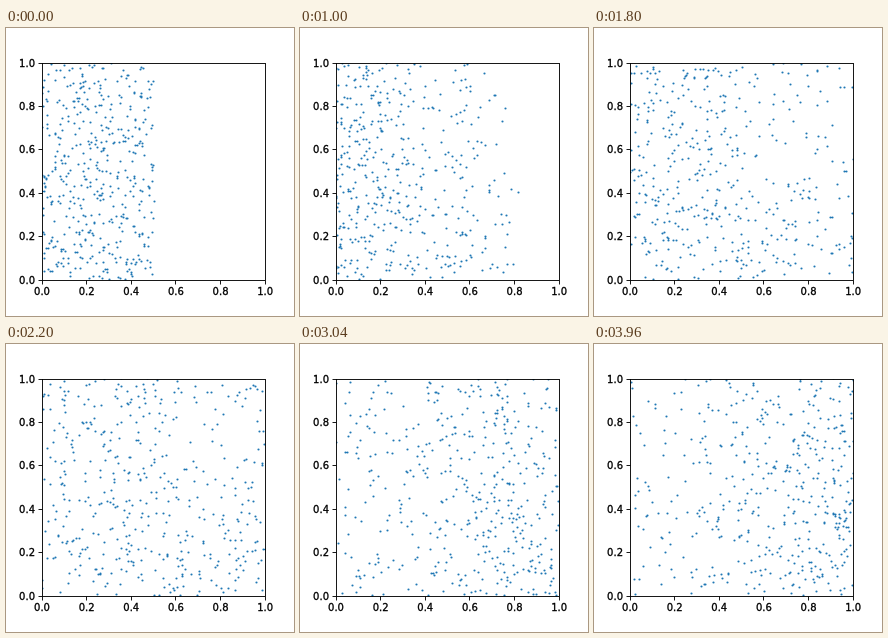
An HTML page that plays this animation: 288 by 288 pixels, repeating every 4 s.

```html
<!DOCTYPE html>
<html lang="en">
<head>
<meta charset="utf-8">
<title>Gas expansion</title>
<style>
  html, body { margin: 0; width: 100%; height: 100%; overflow: hidden; background: #fff; }
  svg { display: block; width: 100%; height: 100%; }
  text { font: 10px "DejaVu Sans", sans-serif; stroke: #000; stroke-width: .3px; }
</style>
</head>
<body>
<svg viewBox="0 0 288 288">
  <clipPath id="box"><rect x="36" y="35" width="224" height="218"/></clipPath>
  <path id="dots" clip-path="url(#box)" fill="none" stroke="#1f77b4" stroke-width="2.2" stroke-linecap="round"/>
  <g id="axes">
    <rect x="36.5" y="35.5" width="223" height="217" fill="none" stroke="#000" stroke-width=".9"/>
  </g>
</svg>
<script>
const COUNT = 450, SPEED = 0.0127, STEP = 40, STEPS = 100;
const dots = document.getElementById('dots');
const axes = document.getElementById('axes');

const px = x => Math.floor(36 + 223.2 * x) + 0.5;
const py = y => Math.floor(252 - 217.44 * y) + 0.5;

function add(name, attrs, text = '') {
  const el = document.createElementNS('http://www.w3.org/2000/svg', name);
  for (const key in attrs) el.setAttribute(key, attrs[key]);
  el.textContent = text;
  axes.append(el);
}

for (let i = 0; i <= 5; i++) {
  const value = i / 5, label = value.toFixed(1);
  const x = px(value), y = py(value) + (i === 5 ? 1 : 0);
  add('path', { d: `M${x} 252.5v4M36.5 ${y}h-4`, stroke: '#000', 'stroke-width': 0.9 });
  add('text', { x: 36 + 223.2 * value, y: 267, 'text-anchor': 'middle' }, label);
  add('text', { x: 29, y: y + 3.5, 'text-anchor': 'end' }, label);
}

let seed = 20417;
function random() {
  seed = (seed * 1664525 + 1013904223) >>> 0;
  return seed / 4294967296;
}

const particles = Array.from({ length: COUNT }, () => {
  const x = random() / 2, y = random(), angle = random() * 2 * Math.PI;
  return { x, y, vx: SPEED * Math.cos(angle), vy: SPEED * Math.sin(angle) };
});

// Folds free flight back into the unit box: elastic walls.
function bounce(p) {
  const q = ((p % 2) + 2) % 2;
  return q > 1 ? 2 - q : q;
}

function draw(time) {
  const n = Math.floor(time / STEP) % STEPS + 0.5;
  dots.setAttribute('d', particles.map(p =>
    `M${px(bounce(p.x + p.vx * n))} ${py(bounce(p.y + p.vy * n))}h0`).join(''));
}

const start = performance.now();
function tick() {
  draw(performance.now() - start);
  requestAnimationFrame(tick);
}
tick();
</script>
</body>
</html>
```
